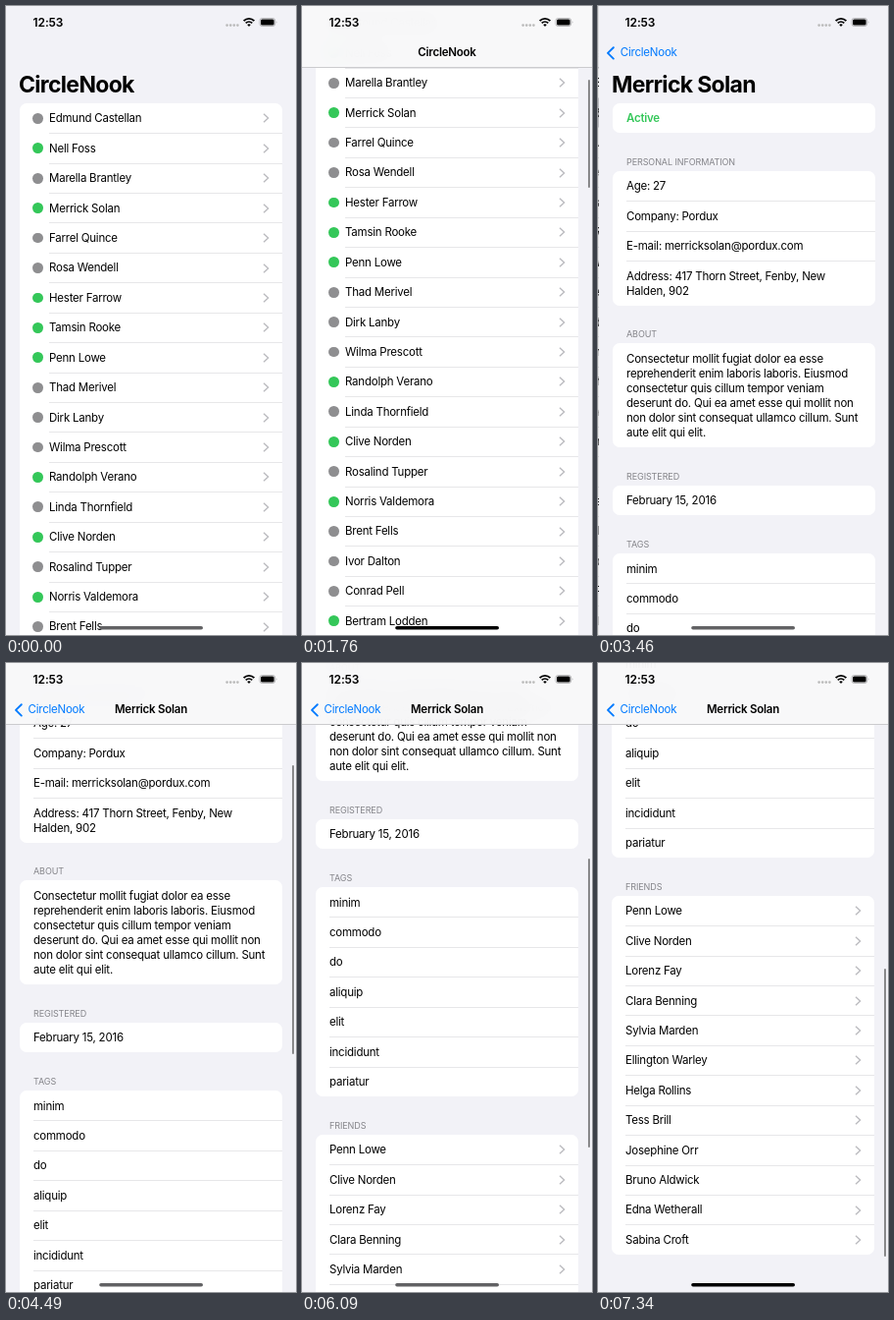
Recreate the animation shown at these times as an HTML page. Size 296 by 640 pixels, loop 8 s.

```html
<!DOCTYPE html>
<html lang="en">
<head>
<meta charset="utf-8">
<title>Contacts app</title>
<style>
  html, body { margin: 0; width: 296px; height: 640px; overflow: hidden; background: #f2f2f7; }
  body { position: relative; font: 11.5px/15.05px Inter, sans-serif; letter-spacing: -.02em; color: #000; }
  .page, .body, .bar, .nav, .status { position: absolute; left: 0; top: 0; width: 296px; }
  .page { height: 640px; overflow: hidden; background: #f2f2f7; }
  .body { padding-top: 98.8px; will-change: transform; }
  h1 { position: absolute; left: 13px; top: 64.5px; margin: 0; font: 700 23px/30px Inter, sans-serif; letter-spacing: -.03em; white-space: nowrap; }
  .card { position: relative; margin: 0 14px; border-radius: 7px; background: #fff; overflow: hidden; }
  .row { position: relative; padding: 8.5px 0 6.88px 14px; white-space: nowrap; }
  .row + .row::before { content: ""; position: absolute; left: 14px; right: 0; top: 0; height: 1px; background: #e7e7e9; }
  #list .row { padding-left: 30px; }
  #list .row + .row::before { left: 30px; }
  #list .card { padding-bottom: 40px; }
  .dot { position: absolute; left: 13.2px; top: 10.2px; width: 10.8px; height: 10.8px; border-radius: 50%; background: #8e8e90; }
  .on { background: #34c759; }
  .go { position: absolute; right: 13px; top: 10.6px; width: 7px; height: 10px; fill: none; stroke: #bcbcc0; stroke-width: 1.4; }
  h2 { box-sizing: border-box; height: 38.75px; margin: 0; padding: 24.7px 28px 0; font: 400 9px/9px Inter, sans-serif; letter-spacing: -.01em; color: #85858a; text-transform: uppercase; }
  .active { color: #34c759; font-weight: 600; }
  .bar { box-sizing: border-box; height: 63px; background: #f2f2f7; }
  .bar.raised { background: rgba(248, 248, 249, .94); backdrop-filter: blur(10px); border-bottom: 1px solid #cbcbce; }
  .thumb { position: absolute; left: 292px; width: 2px; border-radius: 1px; background: #88888a; }
  .nav { height: 63px; }
  .nav div { position: absolute; top: 40.3px; white-space: nowrap; }
  .nav .title { left: 0; width: 296px; text-align: center; font-weight: 600; }
  .nav .back { left: 22.5px; color: #007aff; }
  .nav svg { position: absolute; left: 0; top: 0; }
  .status text { font-size: 12px; font-weight: 600; letter-spacing: -.01em; }
</style>
</head>
<body>
<div class="page" id="list"></div>
<div class="page" id="detail"></div>
<div class="nav">
  <div class="title" id="listTitle"></div>
  <div class="title" id="detailTitle"></div>
  <div class="back" id="back"></div>
  <svg id="arrow" width="22" height="63" fill="none" stroke="#007aff" stroke-width="1.9" stroke-linecap="round" stroke-linejoin="round"><path d="M15.8 42.2L10 47.9L15.8 53.6"/></svg>
</div>
<svg class="status" width="296" height="640">
  <text x="27.6" y="20.9">12:53</text>
  <g fill="#bbb"><circle cx="225.6" cy="19.6" r="1.3"/><circle cx="229.2" cy="19.6" r="1.3"/><circle cx="232.8" cy="19.6" r="1.3"/><circle cx="236.4" cy="19.6" r="1.3"/></g>
  <path d="M242.6 15.1A7.6 7.6 0 0 1 253.4 15.1M244.7 17.4A4.7 4.7 0 0 1 251.3 17.4" fill="none" stroke="#000" stroke-width="1.8"/>
  <path d="M248 21l-1.8-1.9a2.6 2.6 0 0 1 3.6 0z"/>
  <rect x="258.9" y="12.5" width="15.8" height="8" rx="2.5" fill="none" stroke="#a5a5a7" stroke-width=".8"/>
  <rect x="260" y="13.5" width="13.6" height="6" rx="1.5"/>
  <path d="M275.8 15.2q1.4 1.3 0 2.6z" fill="#a5a5a7"/>
  <rect id="home" x="95.2" y="630.9" width="105.8" height="3.5" rx="1.75"/>
</svg>
<script>
const $ = id => document.getElementById(id);
const app = "CircleNook", person = "Merrick Solan";

// A leading + marks an active friend
const people = ["Edmund Castellan", "+Nell Foss", "Marella Brantley", "+" + person, "Farrel Quince",
  "Rosa Wendell", "+Hester Farrow", "+Tamsin Rooke", "+Penn Lowe", "Thad Merivel", "Dirk Lanby",
  "Wilma Prescott", "+Randolph Verano", "Linda Thornfield", "+Clive Norden", "Rosalind Tupper",
  "+Norris Valdemora", "Brent Fells", "Ivor Dalton", "Conrad Pell", "+Bertram Lodden"];
const friends = ["Penn Lowe", "Clive Norden", "Lorenz Fay", "Clara Benning", "Sylvia Marden", "Ellington Warley",
  "Helga Rollins", "Tess Brill", "Josephine Orr", "Bruno Aldwick", "Edna Wetherall", "Sabina Croft"];
const sections = [
  ["Personal information", ["Age: 27", "Company: Pordux", "E-mail: merricksolan@pordux.com",
    "Address: 417 Thorn Street, Fenby, New<br>Halden, 902"]],
  ["About", ["Consectetur mollit fugiat dolor ea esse<br>reprehenderit enim laboris laboris. Eiusmod<br>" +
    "consectetur quis cillum tempor veniam<br>deserunt do. Qui ea amet esse qui mollit non<br>" +
    "non dolor sint consequat ullamco cillum. Sunt<br>aute elit qui elit."]],
  ["Registered", ["February 15, 2016"]],
  ["Tags", ["minim", "commodo", "do", "aliquip", "elit", "incididunt", "pariatur"]]
];

const go = '<svg class="go"><path d="M1 .8L5.6 5L1 9.2"/></svg>';
const row = html => `<div class="row">${html}</div>`;
const card = rows => `<div class="card">${rows.map(row).join("")}</div>`;
const section = ([name, rows]) => `<h2>${name}</h2>` + card(rows);

function build(id, title, content) {
  $(id).innerHTML = `<div class="body"><h1>${title}</h1>${content}</div><div class="bar"></div><div class="thumb"></div>`;
  const [body, bar, thumb] = $(id).children;
  return { el: $(id), body, bar, thumb, h1: body.firstChild };
}
const list = build("list", app, card(people.map(p =>
  `<i class="dot ${p[0] == "+" ? "on" : ""}"></i>${p.replace("+", "")}${go}`)));
const detail = build("detail", person, card(['<span class="active">Active</span>']) +
  sections.map(section).join("") + section(["Friends", friends.map(f => f + go)]));
const pressed = list.body.querySelectorAll(".row")[3];
$("listTitle").textContent = $("back").textContent = app;
$("detailTitle").textContent = person;

// The screen refreshes only at these times
const ticks = [0, 500, 630, 770, 900, 1010, 1120, 1230, 1350, 1510, 1640, 1760,
  2910, 3010, 3120, 3230, 3340, 3460, 3570, 3700, 4360, 4490, 4650, 4770, 4920, 5040, 5160,
  6090, 6210, 6400, 6520, 6650, 6770, 6890, 7000, 7120];

const glide = (t, start, dist, tau) => t < start ? 0 : dist * (1 - Math.exp((start - t) / tau));
const listScroll = t => glide(Math.min(t, 1760), 450, 99, 351);
function detailScroll(t) {
  const u = t - 6060;
  if (u < 0) return glide(t, 4310, 225.6, 230);
  return 571 + Math.exp(-u / 150) * (1.83 * u - 351); // flick past the end and bounce back
}

function scroll(page, y, rate, size, end) {
  const raised = y > 40, over = Math.max(0, y - end);
  page.body.style.transform = `translateY(${-y}px)`;
  page.bar.classList.toggle("raised", raised);
  page.h1.style.opacity = raised ? 0 : 1;
  page.thumb.style.display = y ? "" : "none";
  page.thumb.style.top = 66 + (raised ? (Math.min(y, end) - 40) * rate + over : 40 - y) + "px";
  page.thumb.style.height = size - over + "px";
}

function draw(now) {
  const time = now % 8000, t = ticks.filter(k => k <= time).pop();
  const y1 = Math.round(listScroll(t)), y2 = Math.round(detailScroll(t));
  scroll(list, y1, .155, 110, 1e4);
  scroll(detail, y2, .459, 294, 571);

  const w = Math.max(0, t - 2960) * .016, away = t >= 3570 ? 0 : (1 + w) * Math.exp(-w);
  list.el.style.transform = `translateX(${-89 * (1 - away)}px)`;
  list.el.style.filter = away < 1 ? `brightness(${.9 + .1 * away})` : "none";
  detail.el.style.transform = `translateX(${Math.round(296 * away)}px)`;
  pressed.style.background = t >= 2910 ? "#d1d1d6" : "";

  $("listTitle").style.opacity = y1 > 35 ? away : 0;
  $("listTitle").style.transform = `translateX(${-97 * (1 - away)}px)`;
  $("back").style.opacity = $("arrow").style.opacity = 1 - away;
  $("back").style.transform = `translateX(${97 * away}px)`;
  $("detailTitle").style.opacity = y2 > 35 ? 1 : 0;
  $("home").style.fill = t < 630 || t >= 3230 && t < 6210 ? "#626264" : "#000";
}

const begin = performance.now();
function frame() {
  draw(performance.now() - begin);
  requestAnimationFrame(frame);
}
frame();
</script>
</body>
</html>
```
